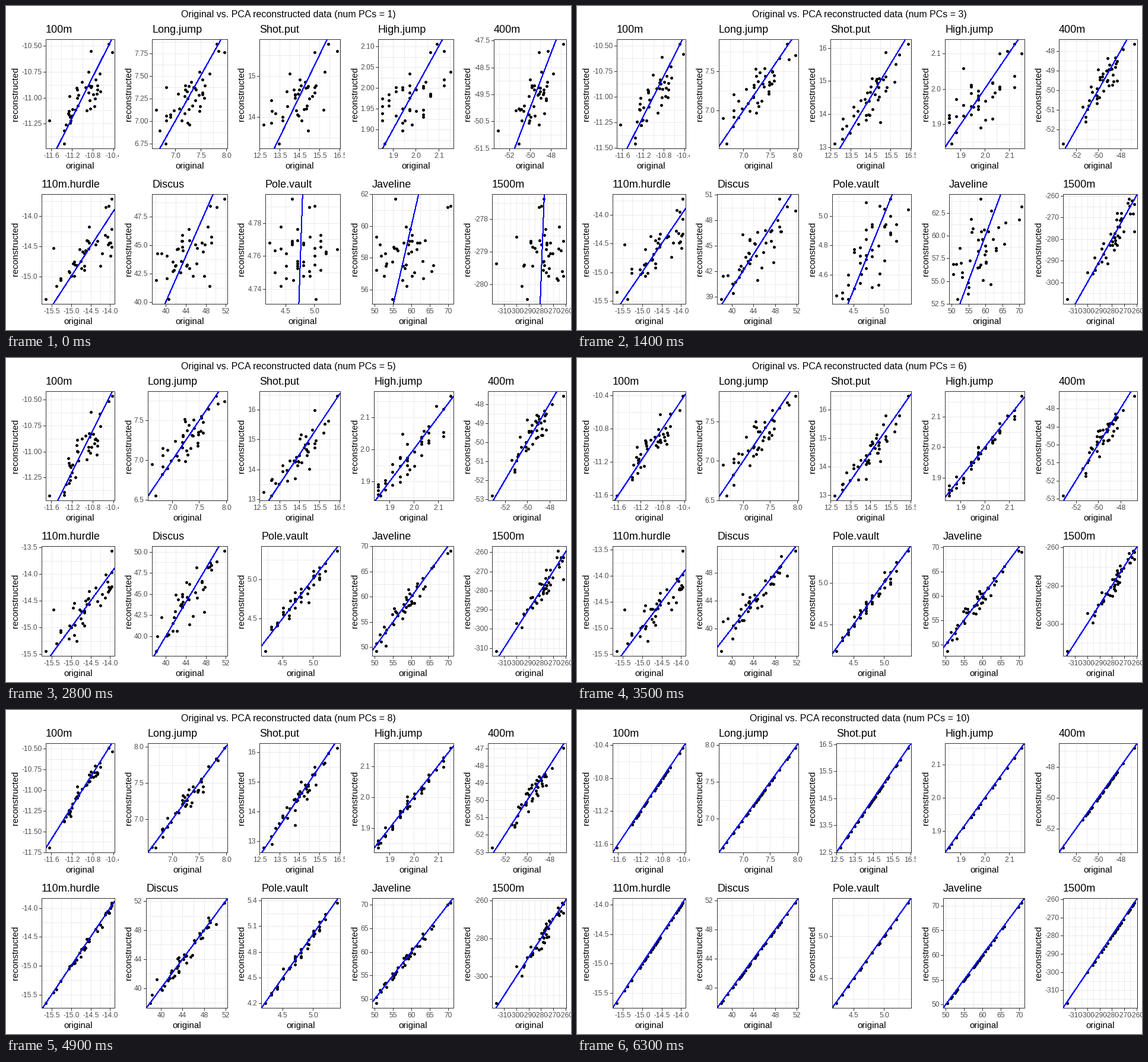
Recreate the animation shown at these times as a matplotlib script. Size 952 px wide and 546 px high, loop 7000 ms.

```python
import math

import matplotlib.pyplot as plt
import numpy as np
from matplotlib.animation import FuncAnimation
from matplotlib.transforms import Bbox, TransformedBbox

W, H, DPI = 952, 546, 64
PT = 72 / DPI                       # points per pixel
CELL = W / 5
ROWS = [(55, 239), (316, 501)]      # panel top and bottom
plt.rcParams["font.family"] = "Liberation Sans"

EVENTS = ["100m", "Long.jump", "Shot.put", "High.jump", "400m",
          "110m.hurdle", "Discus", "Pole.vault", "Javeline", "1500m"]
SIGN = np.array([-1, 1, 1, 1, -1, -1, 1, 1, 1, -1])
MEAN = SIGN * [10.998, 7.26, 14.477, 1.977, 49.616,
               14.606, 44.326, 4.762, 58.317, 279.025]
SD = np.array([0.263, 0.316, 0.824, 0.089, 1.153,
               0.472, 3.378, 0.278, 4.827, 11.673])

# upper triangle of the correlations between events
CORR = [[.60, .36, .25, .52, .58, .22, .08, .16, -.06],
        [.18, .29, .60, .51, .19, .20, .12, .03],
        [.49, .14, .25, .62, .06, .37, -.12],
        [.19, .28, .37, -.16, .17, .04],
        [.55, .12, .08, .00, .41],
        [.33, .00, -.01, .04],
        [-.15, .16, -.26],
        [-.03, -.25],
        [.18]]

# the outstanding results; the rest of the field is drawn at random
LEADERS = SIGN * np.array([
    [11.64, 6.81, 14.57, 1.95, 50.14, 14.93, 47.60, 4.92, 52.33, 262.10],
    [10.44, 7.96, 15.23, 2.06, 49.19, 14.13, 50.11, 4.90, 69.71, 282.00],
    [11.14, 6.61, 15.69, 2.03, 51.04, 14.88, 41.90, 4.80, 65.82, 277.94],
    [11.33, 7.27, 12.68, 1.98, 49.20, 15.29, 37.92, 4.62, 57.44, 266.60],
    [10.85, 7.84, 16.36, 2.12, 48.36, 14.05, 48.72, 5.00, 70.52, 280.01],
    [10.87, 7.38, 13.07, 1.88, 48.51, 14.01, 40.11, 5.00, 51.53, 274.21],
    [10.89, 7.47, 15.73, 2.15, 48.97, 14.56, 48.34, 4.40, 58.46, 265.42],
    [11.36, 6.68, 14.92, 1.94, 53.20, 15.39, 48.66, 4.40, 58.62, 296.12],
    [10.50, 7.81, 15.93, 2.09, 46.81, 13.97, 51.65, 4.60, 55.54, 278.11],
    [11.36, 6.80, 13.46, 1.86, 51.16, 15.67, 40.49, 5.02, 54.68, 291.70],
    [10.85, 6.81, 15.24, 1.91, 49.27, 14.01, 49.02, 4.20, 61.52, 272.74],
    [10.80, 7.53, 14.26, 1.88, 48.81, 14.80, 42.05, 5.40, 61.33, 276.33],
    [11.02, 7.30, 14.77, 2.04, 48.37, 14.09, 48.95, 4.92, 50.31, 300.20],
    [10.86, 7.07, 14.81, 1.94, 51.16, 14.96, 46.07, 4.70, 53.05, 317.00]])
FIELD = 41


def correlation():
    r = np.eye(10)
    for i, row in enumerate(CORR):
        r[i, i + 1:] = r[i + 1:, i] = row
    return r


def athletes(r, seed=4):
    """Leaders plus random athletes that keep the overall means and spread."""
    lead = (LEADERS - MEAN) / SD
    n = FIELD - len(lead)
    mid = -lead.sum(axis=0) / n
    scatter = (FIELD - 1) * r - lead.T @ lead - n * np.outer(mid, mid)
    val, vec = np.linalg.eigh(scatter)
    root = vec * np.sqrt(np.maximum(val, 1.5)) @ vec.T
    draw = np.random.default_rng(seed).uniform(-1, 1, (n, 10))
    base, _ = np.linalg.qr(draw - draw.mean(axis=0))
    rest = (mid + base @ root) * SD + MEAN
    rest[:, 3] = 1.85 + 0.03 * np.round((rest[:, 3] - 1.85) / 0.03)
    rest[:, 7] = np.round(rest[:, 7], 1)
    low, high = LEADERS.min(axis=0), LEADERS.max(axis=0)
    low[3] = 1.85
    return np.vstack([LEADERS, np.clip(rest, low, high)])


R = correlation()
DATA = athletes(R)
AXES = np.linalg.eigh(R)[1][:, ::-1]


def rebuild(k):
    v = AXES[:, :k]
    return (DATA - MEAN) / SD @ v @ v.T * SD + MEAN


def nice_breaks(lo, hi, m=5):
    """Step and breaks with the best mix of simplicity, coverage and density."""
    span, best, found = hi - lo, -9, None
    for j in (1, 2, 3):
        for i, q in enumerate((1, 5, 2, 2.5, 4, 3)):
            for k in range(2, 11):
                z0 = math.ceil(math.log10(span / (k + 1) / j / q))
                for z in (z0, z0 + 1):
                    step = j * q * 10.0 ** z
                    first = (math.floor(hi / step) - k + 1) * j
                    last = math.ceil(lo / step) * j
                    for start in range(first, last + 1):
                        a = start * step / j
                        b = a + step * (k - 1)
                        zero = start % j == 0 and a <= 0 <= b
                        simple = 1 - i / 5 - j + 1 * zero
                        cover = 1 - 0.5 * ((hi - b) ** 2 + (lo - a) ** 2) / (0.1 * span) ** 2
                        ratio = (k - 1) / (b - a) * (max(b, hi) - min(a, lo)) / (m - 1)
                        dense = 2 - max(ratio, 1 / ratio)
                        score = 0.25 * simple + 0.2 * cover + 0.5 * dense + 0.05
                        if score > best + 1e-9:
                            best, found = score, (a, step)
    a, step = found
    first, last = math.ceil((lo - a) / step), math.floor((hi - a) / step)
    major = [a + step * n for n in range(first, last + 1)]
    halves = range(math.ceil(2 * (lo - a) / step), math.floor(2 * (hi - a) / step) + 1)
    return major, [a + step * n / 2 for n in halves]


def labels(values):
    d = 0
    while any(abs(round(v, d) - v) > 1e-7 for v in values):
        d += 1
    return [f"{v:.{d}f}" for v in values]


def label_width(s):
    return sum({"-": 4, ".": 3}.get(c, 7) for c in s)


class Scale:
    """Maps one axis, widened by 5 % on both sides, to pixels."""

    def __init__(self, values):
        pad = 0.05 * np.ptp(values)
        self.lo, self.hi = values.min() - pad, values.max() + pad
        self.major, self.grid = nice_breaks(self.lo, self.hi)
        self.labels = labels(self.major)

    def place(self, v, start, end):
        return start + (np.asarray(v) - self.lo) / (self.hi - self.lo) * (end - start)


X_SCALES = [Scale(col) for col in DATA.T]

fig = plt.figure(figsize=(W / DPI, H / DPI), dpi=DPI, facecolor="white")
ax = fig.add_axes([0, 0, 1, 1])


def clip(artist, left, top, right, bottom):
    box = Bbox([[left, top], [right, bottom]])
    artist.set_clip_on(True)
    artist.set_clip_box(TransformedBbox(box, ax.transData))


def line(xs, ys, color, z):
    return ax.plot(xs, ys, color=color, lw=PT, zorder=z, antialiased=False,
                   solid_capstyle="butt")[0]


def write(x, y, s, px, color="black", **kw):
    kw = {"ha": "center", "va": "baseline", **kw}
    return ax.text(x, y, s, fontsize=px * PT, color=color, zorder=6, **kw)


def panel(i, ys):
    cell = i % 5 * CELL
    top, bottom = ROWS[i // 5]
    sx, sy = X_SCALES[i], Scale(ys)
    left = round(cell + 32 + max(map(label_width, sy.labels)))
    right = int(cell + 183.07)

    def px(v):
        return np.round(sx.place(v, left, right))

    def py(v):
        return np.round(sy.place(v, bottom, top))

    for v in px(sx.grid):
        line([v, v], [top, bottom], "#ebebeb", 1)
    for v in py(sy.grid):
        line([left, right], [v, v], "#ebebeb", 1)

    dots = ax.scatter(px(DATA[:, i]) + 0.5, py(ys) - 0.5, s=(5 * PT) ** 2,
                      c="black", linewidths=0, zorder=2, antialiased=False)
    ends = np.array([sx.lo, sx.hi])
    diagonal = line(sx.place(ends, left, right), sy.place(ends, bottom, top),
                    "#0000ff", 3)
    for artist in (dots, diagonal):
        clip(artist, left, top, right, bottom)

    line([left, right, right, left, left], [top, top, bottom, bottom, top],
         "#333333", 4)
    for v, s in zip(px(sx.major), sx.labels):
        line([v, v], [bottom, bottom + 4], "#333333", 4)
        clip(write(v + 0.5, bottom + 16, s, 12, "#4d4d4d"),
             cell, 0, cell + CELL, H)
    for v, s in zip(py(sy.major), sy.labels):
        line([left - 4, left], [v, v], "#333333", 4)
        write(left - 6.5, v + 4, s, 12, "#4d4d4d", ha="right")

    write((left + right) / 2, bottom + 34, "original", 15)
    write(cell + 20.5, (top + bottom) / 2, "reconstructed", 15,
          rotation=90, rotation_mode="anchor")
    write(left, top - 11, EVENTS[i], 18, ha="left")


def draw(n):
    ax.clear()
    ax.set_axis_off()
    ax.set_xlim(0, W)
    ax.set_ylim(H - 1, -1)
    write(W / 2, 18, f"Original vs. PCA reconstructed data (num PCs = {n + 1})", 16)
    for i, ys in enumerate(rebuild(n + 1).T):
        panel(i, ys)
    return []


anim = FuncAnimation(fig, draw, frames=10, interval=700, init_func=lambda: [],
                     repeat=True, repeat_delay=0, blit=False)
plt.show()
```
